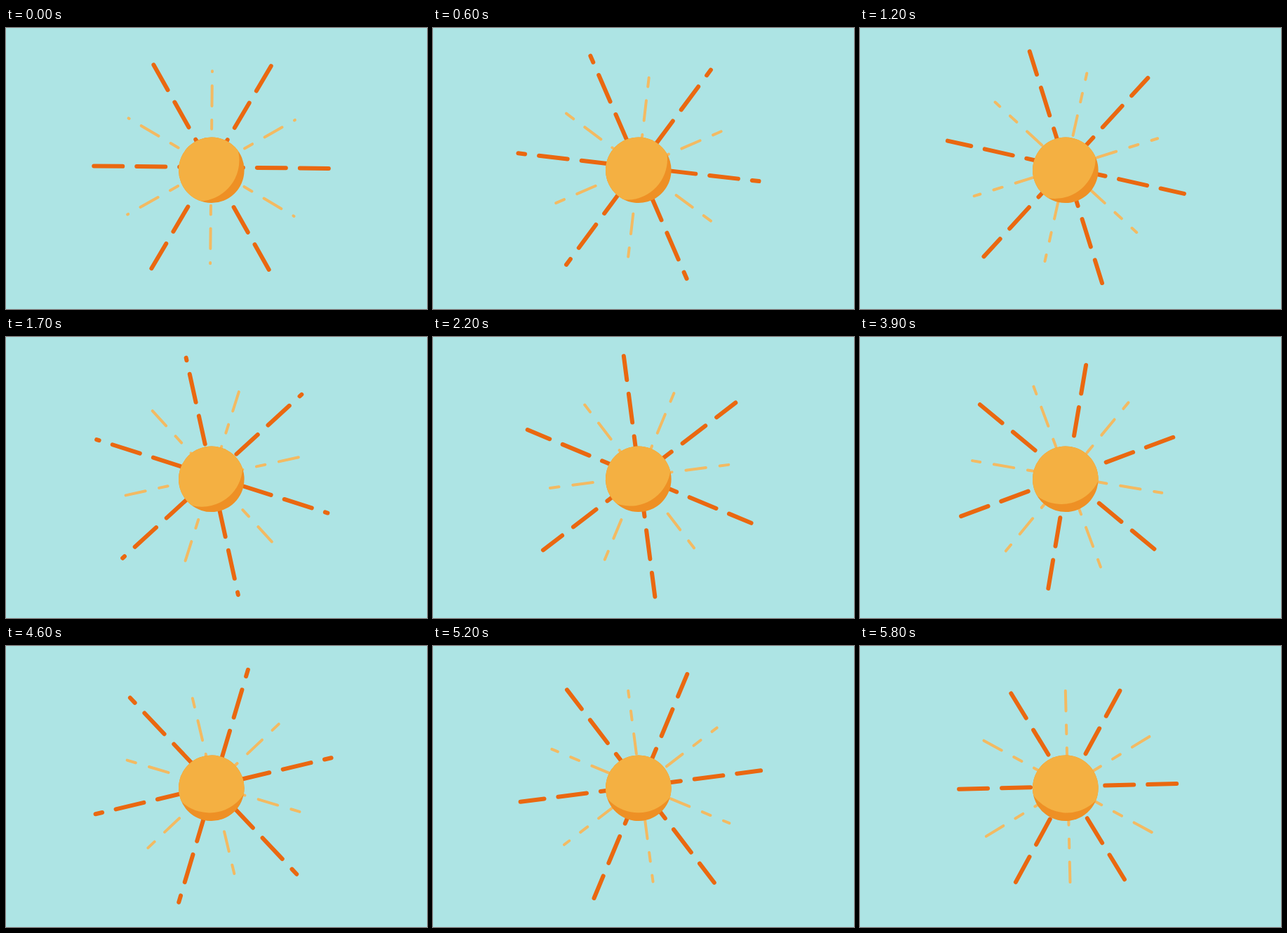
An HTML page for the animation above (5900 ms loop, 600x400 px).

```html
<!DOCTYPE html>
<html lang="en">
<head>
<meta charset="utf-8">
<title>Sun</title>
<style>
  html, body { margin: 0; width: 100%; height: 100%; overflow: hidden; background: #ade4e4; }
  svg { display: block; width: 600px; height: 400px; }
  line { stroke-linecap: round; }
  .long { stroke: #ea6810; stroke-width: 6; stroke-dasharray: 41 20; }
  .short { stroke: #f3ba62; stroke-width: 4; stroke-dasharray: 28.7 20 12.7 20; }
</style>
</head>
<body>
<svg viewBox="0 0 600 400">
  <clipPath id="disc"><circle r="46.8"/></clipPath>
  <g transform="translate(292.8 202.3)">
    <g id="sun">
      <g id="rays" transform="translate(-.3 -4.1)"></g>
      <circle r="46.8" fill="#ee9025"/>
      <g clip-path="url(#disc)">
        <circle r="58" cx="-23" fill="#f4b042" transform="rotate(36.4)"/>
      </g>
    </g>
  </g>
</svg>
<script>
const LOOP = 5900, STEP = 100;
const sun = document.getElementById('sun');
const rays = document.getElementById('rays');

function addRays(kind, length, firstAngle) {
  return Array.from({ length: 6 }, (_, i) => {
    const ray = document.createElementNS('http://www.w3.org/2000/svg', 'line');
    ray.setAttribute('class', kind);
    ray.setAttribute('x2', length);
    ray.setAttribute('transform', `rotate(${firstAngle + i * 60})`);
    return rays.appendChild(ray);
  });
}

const shortRays = addRays('short', 137, 30);
const longRays = addRays('long', 172.7, 0);

// Dashes flow outwards by `shift` pixels.
function flow(group, shift) {
  for (const ray of group) ray.style.strokeDashoffset = -shift;
}

function draw(now) {
  const t = Math.floor(now % LOOP / STEP) * STEP / 1000;
  sun.setAttribute('transform', `rotate(${0.6 + 10 * t})`);
  flow(longRays, 4.3 + 61 * t);
  flow(shortRays, 87.2 + 101.75 * t);
}

const start = performance.now();
function tick() {
  draw(performance.now() - start);
  requestAnimationFrame(tick);
}
tick();
</script>
</body>
</html>
```
